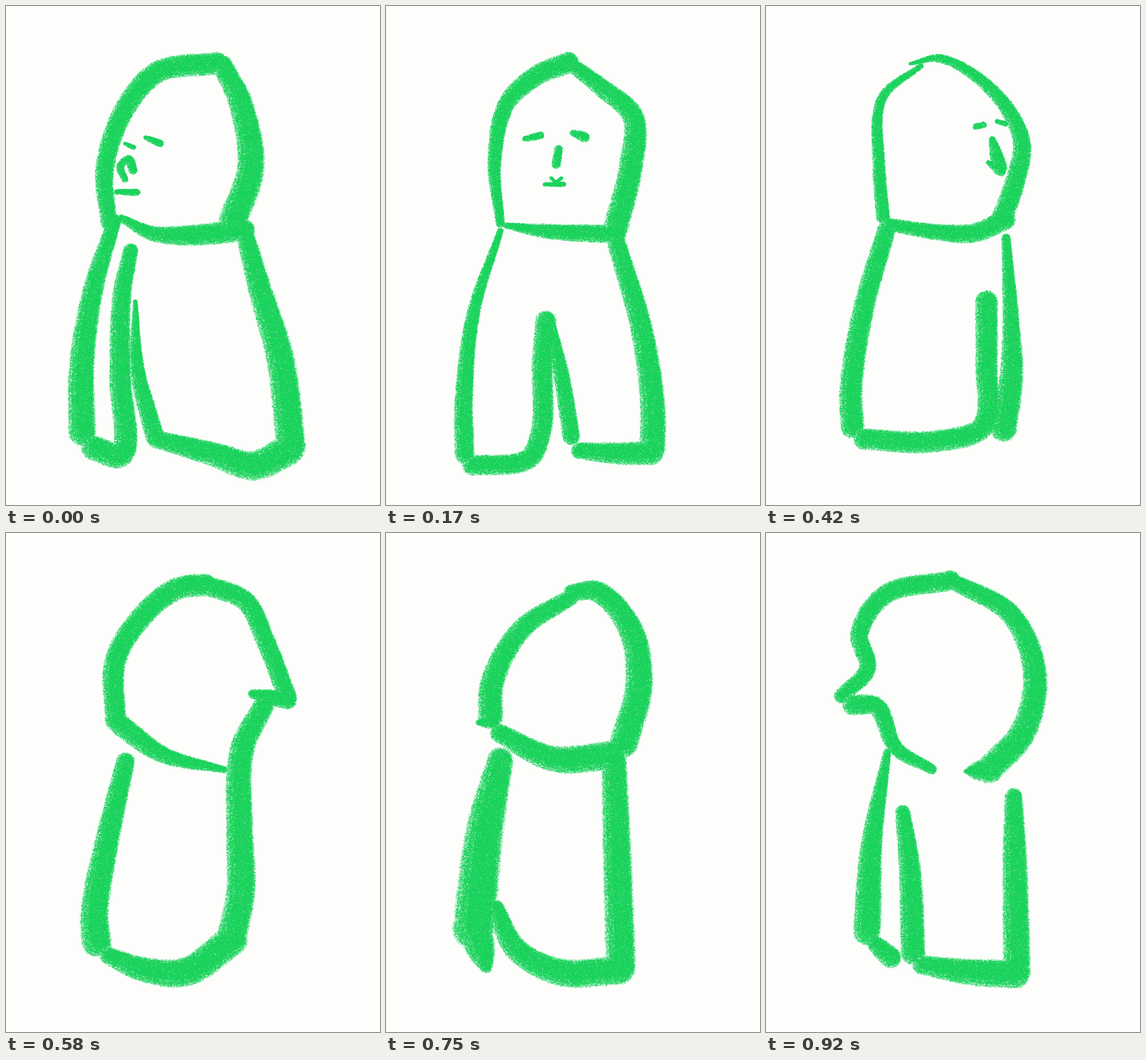
Recreate the animation shown at these times as an HTML page with a canvas. Size 648 px wide and 864 px high, loop 1010 ms.

```html
<!DOCTYPE html>
<html lang="en">
<head>
<meta charset="utf-8">
<title>Turning figure</title>
<style>
html, body { margin: 0; width: 100%; height: 100%; overflow: hidden; background: #fdfdfc; }
canvas { display: block; }
</style>
</head>
<body>
<canvas id="stage" width="648" height="864"></canvas>
<script>
const W = 648, H = 864, LOOP = 1010;
const INK = [25, 210, 91], PAPER = [253, 253, 252];
const stage = document.getElementById('stage').getContext('2d');

// Stroke: width at start and end, then the few points the brush passes.
const threeQuarter = {
  headL: [28, 38, 178,375, 171,285, 205,180, 262,115, 365,99],
  headR: [34, 48, 375,102, 407,170, 424,280, 393,372],
  neck: [14, 38, 200,368, 255,394, 320,397, 412,388],
  bodyL: [24, 46, 188,372, 150,495, 131,630, 132,738],
  legA: [42, 26, 152,765, 198,778, 198,640, 201,500, 216,424],
  legB: [8, 32, 224,512, 228,630, 258,746],
  base: [30, 52, 260,750, 360,776, 430,796, 490,768],
  bodyR: [30, 50, 412,388, 440,490, 475,610, 494,762],
  eyeL: [6, 9, 206,238, 221,245],
  eyeR: [8, 13, 242,228, 267,238],
  nose: [16, 12, 220,284, 213,266, 198,278, 206,300],
  mouth: [9, 12, 191,322, 227,323]
};
const front = {
  headL: [16, 36, 198,376, 188,270, 210,168, 262,120, 316,98],
  headR: [24, 42, 316,98, 372,140, 428,192, 425,275, 398,385],
  neck: [10, 31, 207,380, 275,390, 400,395],
  bodyL: [12, 34, 198,390, 152,530, 135,680, 136,775],
  legA: [34, 36, 150,796, 248,783, 269,735, 271,620, 277,546],
  legB: [22, 30, 284,555, 304,640, 321,745],
  base: [28, 40, 335,770, 400,775, 460,774],
  bodyR: [32, 44, 400,412, 443,560, 462,690, 462,765],
  eyeL: [10, 13, 241,230, 268,224],
  eyeR: [10, 18, 323,220, 344,227],
  nose: [15, 16, 299,248, 295,274],
  mouth: [7, 9, 275,309, 308,309],
  lip: [6, 6, 286,298, 294,304, 304,298]
};
const turnRight = {
  headL: [27, 14, 203,365, 198,280, 208,166, 245,133, 290,106],
  headR: [16, 36, 290,106, 345,126, 426,190, 422,260, 397,358],
  neck: [24, 32, 214,382, 300,393, 404,376],
  bodyL: [14, 40, 199,387, 150,495, 135,640, 136,730],
  legA: [38, 36, 150,748, 300,757, 312,700, 325,590, 333,532],
  legB: [28, 34, 345,540, 363,640, 388,722],
  base: [34, 44, 402,745, 428,740, 443,720],
  bodyR: [12, 42, 401,395, 433,550, 448,680, 444,720],
  eyeL: [11, 13, 283,216, 303,210],
  eyeR: [6, 8, 346,209, 364,214],
  nose: [14, 14, 348,246, 348,268],
  mouth: [10, 16, 318,294, 342,311]
};
const farRight = {
  headL: [24, 10, 203,365, 196,280, 202,158, 268,104],
  headR: [6, 36, 250,100, 302,91, 400,155, 443,235, 430,310, 408,370],
  neck: [22, 34, 212,378, 300,392, 360,393, 415,370],
  bodyL: [32, 40, 208,390, 168,530, 147,670, 150,728],
  legA: [36, 38, 170,750, 290,754, 376,728, 382,620, 382,512],
  bodyR: [16, 44, 416,402, 425,560, 425,640, 412,732],
  eyeL: [11, 11, 363,209, 377,206],
  eyeR: [8, 10, 400,200, 415,204],
  nose: [12, 26, 392,231, 405,280],
  mouth: [8, 16, 385,271, 408,287]
};
const profileRight = {
  headL: [36, 38, 190,325, 190,220, 240,140, 300,95, 345,90],
  headR: [34, 32, 345,90, 415,118, 449,185, 488,285],
  lip: [16, 30, 427,279, 488,290],
  neck: [36, 12, 200,334, 270,383, 378,410],
  bodyL: [32, 50, 207,396, 175,535, 153,665, 157,708],
  legA: [30, 52, 178,732, 235,755, 310,760, 392,705],
  bodyR: [36, 50, 446,300, 410,372, 405,520, 407,620, 390,705]
};
const back = {
  headL: [42, 28, 181,318, 184,260, 235,167, 322,110],
  headR: [28, 48, 322,103, 365,101, 425,170, 438,265, 412,364],
  chin: [10, 22, 160,328, 185,328],
  neck: [32, 48, 197,347, 290,391, 390,385],
  bodyL: [44, 70, 198,394, 172,510, 152,685],
  heel: [54, 20, 158,700, 174,752],
  legA: [30, 48, 190,650, 225,720, 300,760, 405,757],
  bodyR: [42, 50, 395,395, 400,540, 407,752]
};
const profileLeft = {
  headL: [26, 34, 131,282, 176,235, 162,175, 205,108, 320,82],
  headR: [28, 46, 320,82, 425,142, 466,245, 445,345, 386,410],
  nape: [42, 6, 390,410, 345,413],
  neck: [34, 18, 150,298, 190,300, 225,372, 287,409],
  bodyL: [14, 46, 210,380, 183,540, 175,690],
  heel: [28, 36, 190,712, 216,735],
  legB: [26, 42, 237,484, 249,580, 255,726],
  legA: [32, 48, 270,748, 350,760, 432,764],
  bodyR: [30, 46, 429,457, 431,560, 435,760]
};

// Unit vector from point i to point j, or nothing past either end.
function heading(s, i, j) {
  const dx = s[2 * j + 2] - s[2 * i + 2], dy = s[2 * j + 3] - s[2 * i + 3], d = Math.hypot(dx, dy);
  return d ? [dx / d, dy / d] : null;
}

// Brush position and width at u (0..1): a curve that bends less at sharp corners.
function at([w0, w1, ...pts], u) {
  const s = [w0, w1, ...pts], last = pts.length / 2 - 1;
  const i = Math.min(last - 1, Math.floor(u * last)), t = u * last - i;
  const seg = heading(s, i, i + 1);
  const before = heading(s, i - 1, i), after = heading(s, i + 1, i + 2);
  const from = i > 0 && before || seg, to = i < last - 1 && after || seg;
  const len = Math.hypot(pts[2 * i + 2] - pts[2 * i], pts[2 * i + 3] - pts[2 * i + 1]);
  const pos = [0, 1].map(k => {
    const a = pts[2 * i + k], b = pts[2 * i + 2 + k];
    const m = (from[k] + seg[k]) * len / 2, n = (seg[k] + to[k]) * len / 2;
    return a + t * (m + t * (3 * (b - a) - 2 * m - n + t * (2 * (a - b) + m + n)));
  });
  // Pressure builds early and lets go late.
  const q = u * Math.PI / 2, press = w1 > w0 ? Math.sin(q) : 1 - Math.cos(q);
  return [...pos, w0 + (w1 - w0) * press];
}

function dabs(s, n) {
  return Array.from({ length: n + 1 }, (_, i) => at(s, i / n));
}

function trace(pose) {
  return Object.values(pose).flatMap(s => dabs(s, 160));
}

function between(a, b) {
  return Object.keys(a).filter(name => b[name]).flatMap(name => {
    const to = dabs(b[name], 160);
    return dabs(a[name], 160).map((p, i) => p.map((v, k) => (v + to[i][k]) / 2));
  });
}

const cels = [
  [0, () => trace(threeQuarter)],
  [80, () => between(threeQuarter, front)],
  [170, () => trace(front)],
  [250, () => between(front, turnRight)],
  [330, () => trace(turnRight)],
  [420, () => trace(farRight)],
  [500, () => between(farRight, profileRight)],
  [580, () => trace(profileRight)],
  [670, () => between(profileRight, back)],
  [750, () => trace(back)],
  [830, () => between(back, profileLeft)],
  [920, () => trace(profileLeft)]
];

// Paper grain: seeded noise, softened a little.
function makeGrain() {
  const raw = new Float32Array(W * H + W + 1);
  let seed = 7;
  for (let i = 0; i < raw.length; i++) {
    seed = (Math.imul(seed, 1664525) + 1013904223) >>> 0;
    raw[i] = seed / 4294967296;
  }
  return raw.subarray(0, W * H).map((v, i) => .5 * v + .25 * (raw[i + 1] + raw[i + W]));
}
const grain = makeGrain();

// Nested passes: scale, opacity, shift of the dense core.
const PASSES = [[1.06, .36, 0], [.97, .28, 0], [.84, .2, .04], [.6, .16, .1]];

function render(marks) {
  const cel = document.createElement('canvas');
  cel.width = W;
  cel.height = H;
  const ctx = cel.getContext('2d', { willReadFrequently: true });
  ctx.globalCompositeOperation = 'lighter';
  for (const [scale, alpha, shift] of PASSES) {
    ctx.globalAlpha = alpha;
    ctx.beginPath();
    for (const [x, y, w] of marks) {
      const r = w * scale / 2, cx = x + w * shift, cy = y - w * shift * .6;
      ctx.moveTo(cx + r, cy);
      ctx.arc(cx, cy, r, 0, 2 * Math.PI);
    }
    ctx.fill();
  }
  const img = ctx.getImageData(0, 0, W, H), px = img.data;
  for (let i = 0; i < grain.length; i++) {
    const a = px[4 * i + 3] / 255;
    const ink = Math.max(0, Math.min(1, .5 + (a - grain[i]) * 1.5)) * Math.min(1, a * 3);
    for (let k = 0; k < 3; k++) px[4 * i + k] = PAPER[k] + (INK[k] - PAPER[k]) * ink;
    px[4 * i + 3] = 255;
  }
  return img;
}

const cache = [];
let shown = -1;
function draw() {
  const t = performance.now() % LOOP;
  const i = cels.findLastIndex(([start]) => start <= t);
  if (i !== shown) {
    cache[i] = cache[i] || render(cels[i][1]());
    stage.putImageData(cache[i], 0, 0);
    shown = i;
  }
  requestAnimationFrame(draw);
}
draw();
</script>
</body>
</html>
```
